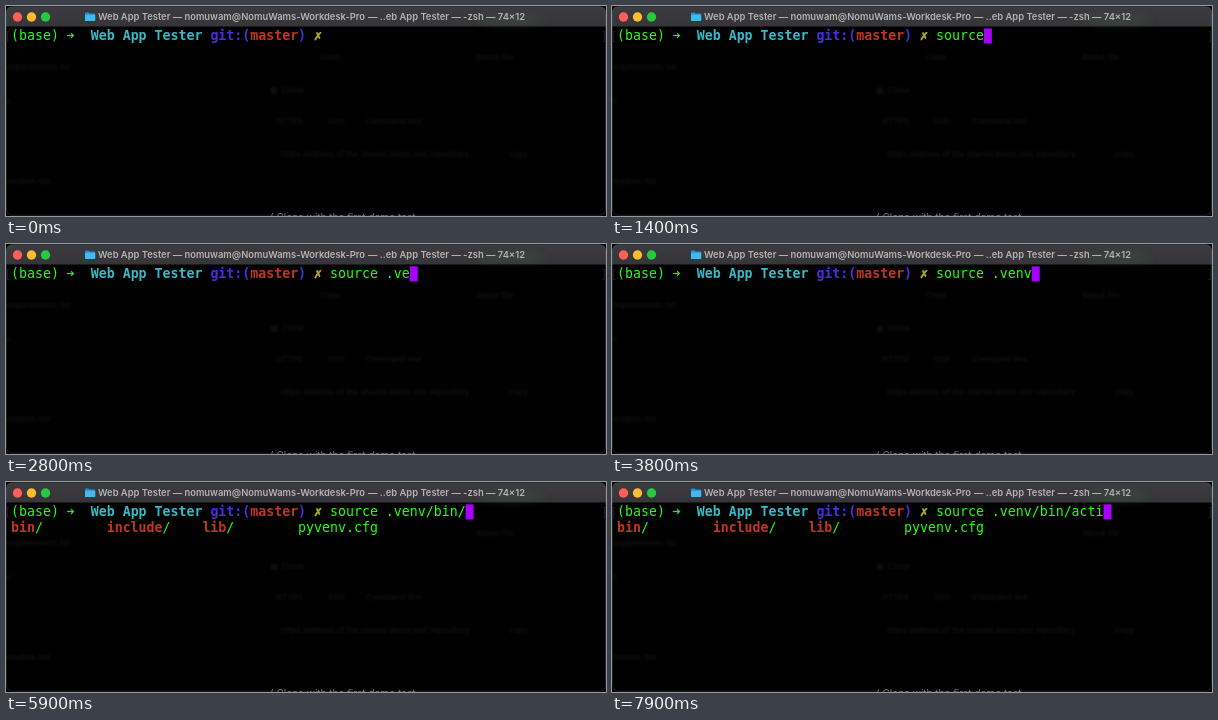
Recreate the animation shown at these times as an HTML page. Size 600 by 210 pixels, loop 8000 ms.

```html
<!DOCTYPE html>
<html lang="en">
<head>
<meta charset="utf-8">
<title>Terminal</title>
<style>
  html, body { margin: 0; width: 100%; height: 100%; overflow: hidden; background: #000; }
  svg { display: block; width: 600px; height: 210px; }
  text { white-space: pre; }
  .title { font: 600 9.4px Inter, Roboto, sans-serif; fill: #b4b3b4; }
  .term { font: 13.25px "DejaVu Sans Mono", "Liberation Mono", monospace; fill: #28fe14; }
  .bold { font-weight: 700; }
  .heavy { font-weight: 700; stroke: #adad27; stroke-width: .6px; }
  .ghost { font: 600 8px Inter, sans-serif; fill: #7078a0; opacity: .13; filter: blur(1.2px); }
  .behind { font: 10px Inter, sans-serif; fill: #777; }
  .tint { fill: #3f6a48; opacity: .28; filter: blur(5px); }
</style>
</head>
<body>
<svg viewBox="0 0 600 210">
  <defs>
    <linearGradient id="bar" x2="0" y2="1">
      <stop offset="0" stop-color="#3c3b3f"/>
      <stop offset="1" stop-color="#363539"/>
    </linearGradient>
    <clipPath id="win"><rect y=".5" width="600" height="209" rx="6"/></clipPath>
    <clipPath id="edge"><rect y="206" width="600" height="4"/></clipPath>
  </defs>

  <g clip-path="url(#win)">
    <rect width="600" height="210" fill="#010101"/>
    <g class="ghost" id="ghost"></g>
    <rect width="600" height="20.5" fill="url(#bar)"/>
    <ellipse class="tint" cx="505" cy="14" rx="34" ry="6"/>
    <path d="M0 20.5H600" stroke="#1c1c1c" stroke-width=".8"/>
  </g>
  <rect x=".5" y=".8" width="599" height="208.4" rx="6" fill="none" stroke="#5a5a5c" stroke-opacity=".5" stroke-width=".7"/>
  <text class="behind" x="264" y="215" clip-path="url(#edge)">( Clone with the first demo test</text>

  <circle cx="11.5" cy="11" r="4.7" fill="#fe5f57"/>
  <circle cx="25.5" cy="11" r="4.7" fill="#febc2e"/>
  <circle cx="39.5" cy="11" r="4.7" fill="#28c840"/>

  <path d="M79 7.2q0-.8.8-.8h2.8l1.1 1.1h4.7q.8 0 .8.8v6q0 .8-.8.8h-8.6q-.8 0-.8-.8z" fill="#1f93cf"/>
  <rect x="79" y="8.8" width="10.2" height="6.3" rx=".8" fill="#46b8ee"/>
  <text class="title" x="92" y="14.2">Web App Tester — nomuwam@NomuWams-Workdesk-Pro</text>
  <text class="title" x="519" y="14.2" text-anchor="end">— ..eb App Tester — -zsh — 74×12</text>

  <path d="M3.5 25.5H1.5V35.5H3.5M596.5 25.5H598.5V35.5H596.5" fill="none" stroke="#777" stroke-opacity=".3" stroke-width=".7"/>
  <g class="term">
    <g id="prompt"></g>
    <g id="list"></g>
    <rect id="cursor" y="22.4" width="8" height="15" fill="#a800ff"/>
    <text id="typed"></text>
  </g>
</svg>
<script>
const LOOP = 8000, CELL = 7.975, LEFT = 5, START = 40;
const ROW1 = 34.4, ROW2 = 49.9;
const COMMAND = "source .venv/bin/acti";
const LIST_AT = 4300;
// time at which each character of the command appears
const KEYS = [400, 600, 800, 900, 1100, 1300, 1700, 2100, 2400, 2700,
  3100, 3500, 4000, 4700, 5000, 5400, 5800, 7000, 7200, 7400, 7700];

const $ = id => document.getElementById(id);
const colX = col => LEFT + col * CELL;

function addText(parent, x, y, str, cls, fill) {
  const el = document.createElementNS("http://www.w3.org/2000/svg", "text");
  el.setAttribute("x", x);
  el.setAttribute("y", y);
  if (cls) el.setAttribute("class", cls);
  if (fill) el.setAttribute("fill", fill);
  el.textContent = str;
  parent.append(el);
}

const RED = "#c23621", BLUE = "#492ee1", CYAN = "#33bbc8";
[
  [0, "(base)"],
  [7, "➜", "bold", "#31e722"],
  [10, "Web App Tester", "bold", CYAN],
  [25, "git:(", "bold", BLUE],
  [30, "master", "bold", RED],
  [36, ")", "bold", BLUE],
  [38, "✗", "heavy", "#adad27"],
].forEach(([col, ...rest]) => addText($("prompt"), colX(col), ROW1, ...rest));

[[0, "bin"], [12, "include"], [24, "lib"]].forEach(([col, name]) => {
  addText($("list"), colX(col), ROW2, name, "bold", RED);
  addText($("list"), colX(col + name.length), ROW2, "/");
});
addText($("list"), colX(36), ROW2, "pyvenv.cfg");

// faint blurred window showing through
[
  [0, 64, "requirements.txt"], [0, 98, "n"], [0, 178, "readme.md"],
  [264, 87, "▣  Clone"], [270, 118, "HTTPS"], [322, 118, "SSH"], [360, 118, "Command line"],
  [275, 151, "https address of the shared demo test repository"], [503, 151, "copy"],
  [314, 54, "Code"], [470, 54, "About file"],
].forEach(g => addText($("ghost"), ...g));

function draw() {
  const t = performance.now() % LOOP;
  const count = KEYS.filter(k => k <= t).length;
  $("typed").textContent = COMMAND.slice(0, count);
  $("cursor").setAttribute("x", colX(START + count));
  $("cursor").style.display = count ? "" : "none";
  $("list").style.display = t >= LIST_AT ? "" : "none";
  requestAnimationFrame(draw);
}
$("typed").setAttribute("x", colX(START));
$("typed").setAttribute("y", ROW1);
draw();
</script>
</body>
</html>
```
